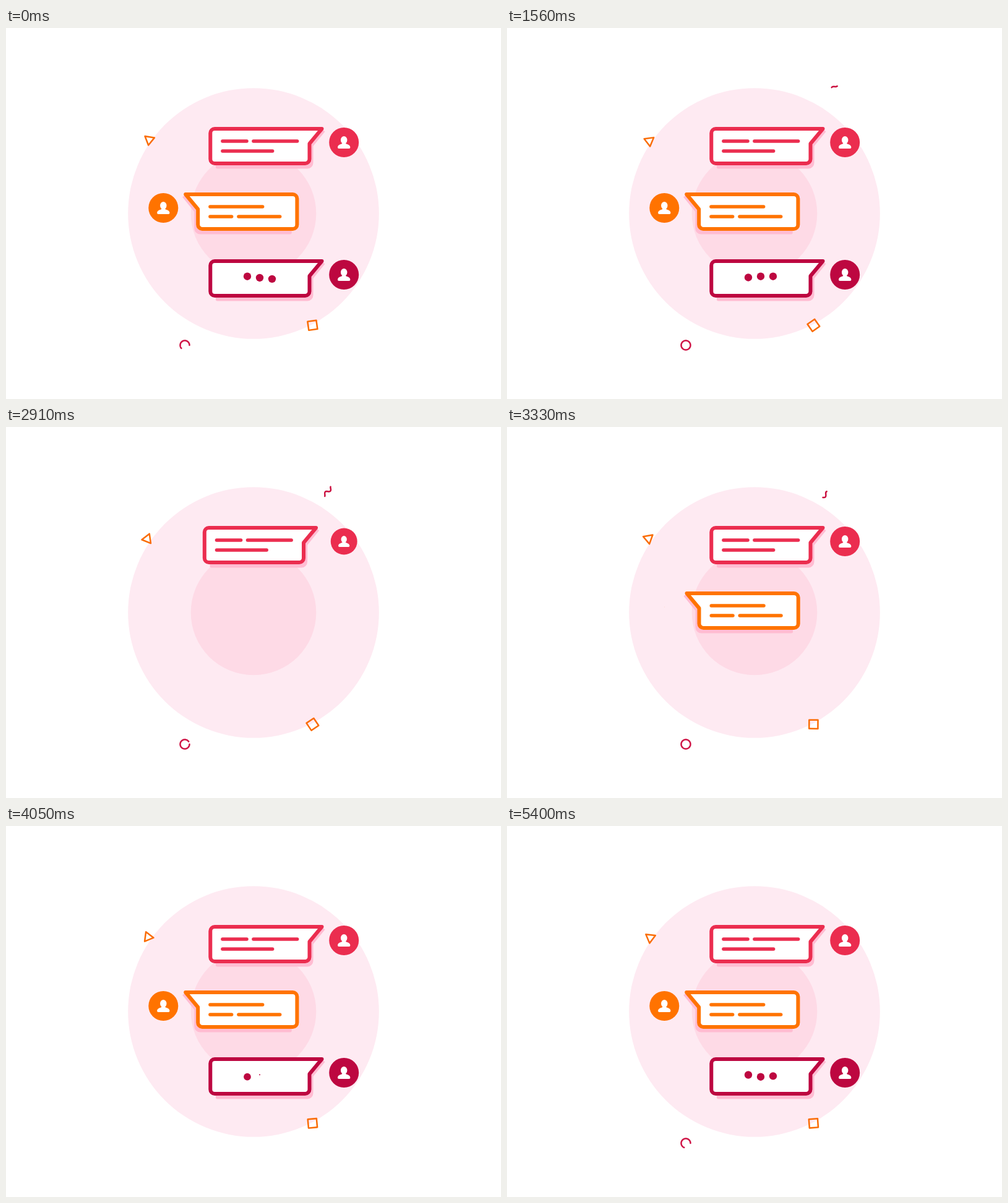
An HTML page for the animation above (5.43 s loop, 800 by 600 pixels).

```html
<!DOCTYPE html>
<html lang="en">
<head>
<meta charset="utf-8">
<title>Chat bubbles</title>
<style>
  html, body { margin: 0; width: 100%; height: 100%; overflow: hidden; background: #fff; }
  svg { display: block; width: 100vw; height: 100vh; }
  .line { fill: none; stroke-linecap: round; stroke-linejoin: round; }
</style>
</head>
<body>
<svg viewBox="0 0 800 600">
  <defs>
    <g id="bubble">
      <path fill="#ffbcd2" d="M339 205V225q0 2.5 2.5 2.5H487a9.5 9.5 0 0 0 9.5-9.5V191L515.5 167.5 510 163Z"/>
      <path fill="#fff" stroke="currentColor" stroke-width="6" stroke-linejoin="round"
        d="M337.3 163H510.5L490.5 187V212a7 7 0 0 1-7 7H337.3a7 7 0 0 1-7-7V170a7 7 0 0 1 7-7Z"/>
    </g>
    <g id="avatar">
      <circle r="24" fill="currentColor"/>
      <ellipse cy="-3.8" rx="5.2" ry="6.2" fill="#fff"/>
      <path fill="#fff" d="M-3-2V1.8C-4 3.4-9.6 3-10.2 8q0 2 2 2H8.2q2 0 2-2C9.6 3 4 3.4 3 1.8V-2Z"/>
    </g>
  </defs>
  <circle cx="400" cy="300" r="202.8" fill="#feeaf2"/>
  <circle cx="400" cy="300" r="101.3" fill="#fedae6"/>

  <g id="chat">
    <g class="message" color="#eb2d4f">
      <g class="slide">
        <use href="#bubble"/>
        <path class="line" stroke="currentColor" stroke-width="5.6" d="M350 183H389M400 183H470.6M350 199H430.6"/>
      </g>
      <use class="avatar" href="#avatar"/>
    </g>
    <g class="message" color="#ff7300">
      <g class="slide">
        <use href="#bubble" transform="translate(800.7 106) scale(-1 1)"/>
        <path class="line" stroke="currentColor" stroke-width="5.6" d="M330 289H414.6M330 305H364.6M376 305H442.6"/>
      </g>
      <use class="avatar" href="#avatar"/>
    </g>
    <g class="message" color="#bd0740">
      <g class="slide">
        <use href="#bubble" y="214"/>
        <g id="dots" fill="currentColor"><circle cx="390"/><circle cx="410"/><circle cx="430"/></g>
      </g>
      <use class="avatar" href="#avatar"/>
    </g>
  </g>

  <path id="triangle" class="line" stroke="#fa6c04" stroke-width="2.5"/>
  <rect id="square" class="line" x="-7.1" y="-7.1" width="14.2" height="14.2" stroke="#fa6c04" stroke-width="2.5"/>
  <path id="ring" class="line" stroke="#cf1446" stroke-width="2.5"/>
  <path id="squiggle" class="line" stroke="#cb1040" stroke-width="2.5"
    d="M533.7 94C531 96 529 94.3 527 94.8C524 95.5 524 97.5 524.8 100C525.6 104 523 105 520 104.2C516 103.5 514.5 105 515.3 109C516 113.5 514 114.3 511 114L507.5 113.6"/>
</svg>
<script>
const LOOP = 5430;
const $ = id => document.getElementById(id);
const all = selector => [...document.querySelectorAll(selector)];
const set = (el, attrs) => Object.entries(attrs).forEach(([key, value]) => el.setAttribute(key, value));
const show = (el, on) => { el.style.display = on ? '' : 'none'; };

// Eased progress of t from start over duration, clamped to 0..1
const ease = (t, start, duration) => {
  const x = Math.min(1, Math.max(0, (t - start) / duration));
  return x * x * (3 - 2 * x);
};
const polar = (cx, cy, r, deg) => {
  const a = deg * Math.PI / 180;
  return [cx + r * Math.cos(a), cy + r * Math.sin(a)];
};

const slides = all('.slide'), avatars = all('.avatar'), messages = all('.message');
const dots = [...$('dots').children];
const squiggleLength = $('squiggle').getTotalLength();

const EXIT = 1560, EXIT_TIME = 300;
const entries = [
  { start: 2590, side: 1, x: 546.2, y: 185 },
  { start: 3085, side: -1, x: 254.3, y: 291 },
  { start: 3585, side: 1, x: 546.2, y: 399 },
];
const dotWaves = [
  { period: 322, phase: -15 },
  { period: 296, phase: -82 },
  { period: 338, phase: 120 },
];
const pop = (t, start) => 1.06 * ease(t, start, 108) - 0.06 * ease(t, start + 108, 80);

function drawMessages(t) {
  const leaving = t < EXIT + EXIT_TIME;
  $('chat').setAttribute('opacity', leaving ? 1 - ease(t, EXIT, EXIT_TIME) : 1);
  // The part before the exit continues the previous pass
  const clock = leaving ? t + LOOP : t;
  entries.forEach(({ start, side, x, y }, i) => {
    show(messages[i], clock >= start);
    const shift = side * (103 - 113 * ease(clock, start, 300) + 10 * ease(clock, start + 300, 150));
    set(slides[i], { transform: `translate(${shift} 0)` });
    set(avatars[i], { transform: `translate(${x} ${y}) scale(${pop(clock, start + 240)})` });
  });
  dots.forEach((dot, i) => {
    const { period, phase } = dotWaves[i];
    const angle = 2 * Math.PI * ((clock - LOOP) / period + phase / 360);
    set(dot, {
      cy: 404.4 - 2.8 * Math.cos(angle),
      r: 6.2 * pop(clock, entries[2].start + 380 + 60 * i),
    });
  });
}

function drawTriangle(t) {
  const turn = 360 * t / LOOP;
  const [cx, cy] = polar(230, 181, 1.6, turn - 14);
  const corners = [0, 120, 240].map(a => polar(cx, cy, 9, turn + 99 + a).join(' '));
  set($('triangle'), { d: `M${corners.join('L')}Z` });
}

function drawRing(t) {
  const beat = t % (LOOP / 3);
  const growing = beat >= 500 && beat < 1500;
  const from = growing ? 0 : 360 * ease(beat < 500 ? beat + LOOP / 3 : beat, 1570, 570);
  const to = growing ? 360 * ease(beat, 640, 570) : 360;
  show($('ring'), to - from > 0.5);
  const points = [];
  const steps = 60;
  for (let i = 0; i <= steps; i++) {
    points.push(polar(289, 513, 7.5, from + (to - from) * i / steps).join(' '));
  }
  set($('ring'), { d: 'M' + points.join('L') });
}

function drawSquiggle(t) {
  const head = squiggleLength * ease(t, 500, 3440);
  const tail = squiggleLength * ease(t, 2360, 1740);
  show($('squiggle'), t > 500 && t < 4100);
  set($('squiggle'), {
    'stroke-dasharray': `${Math.max(0.01, head - tail)} 200`,
    'stroke-dashoffset': -tail,
  });
}

function draw(t) {
  drawMessages(t);
  drawTriangle(t);
  set($('square'), { transform: `translate(495.4 480.8) rotate(${-8 - 720 * t / LOOP})` });
  drawRing(t);
  drawSquiggle(t);
}

const began = performance.now();
function tick() {
  draw((performance.now() - began) % LOOP);
  requestAnimationFrame(tick);
}
draw(0);
requestAnimationFrame(tick);
</script>
</body>
</html>
```
